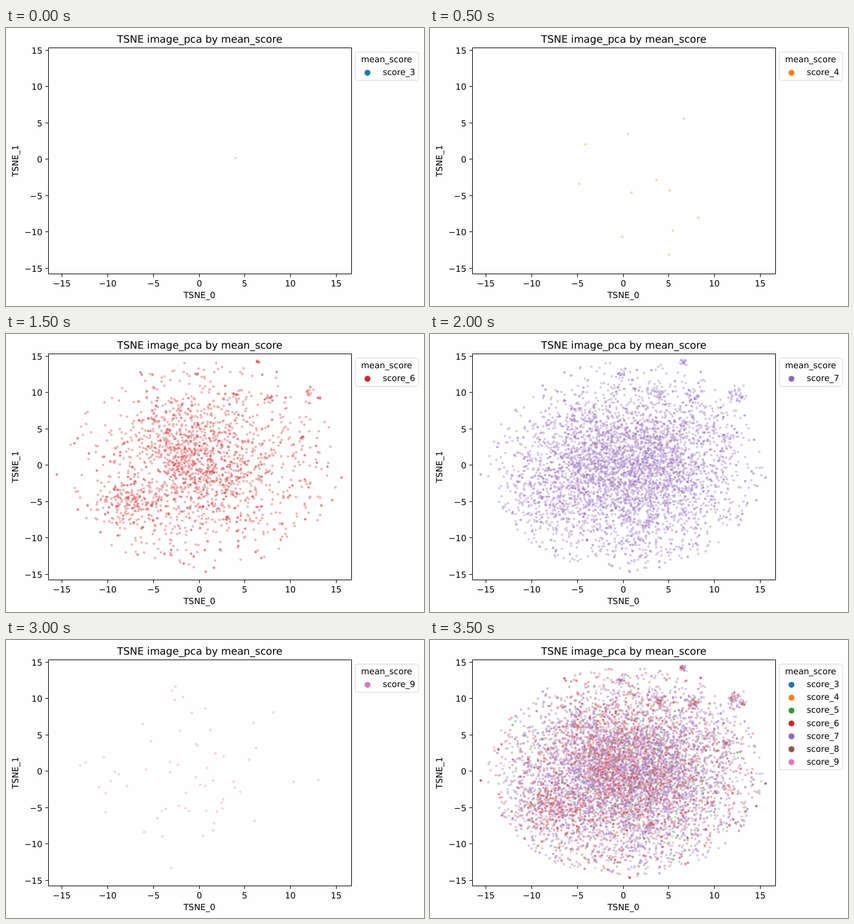
An HTML page with a canvas that plays this animation: 684x455 px, repeating every 4.5 s.

```html
<!DOCTYPE html>
<html lang="en">
<head>
<meta charset="utf-8">
<title>Scatter by score</title>
<style>
  html, body { margin: 0; width: 100%; height: 100%; overflow: hidden; background: #fefefe; }
  canvas, svg { position: absolute; left: 0; top: 0; }
  text { font: 13.89px "DejaVu Sans", sans-serif; text-rendering: geometricPrecision; }
  .title { font-size: 16.67px; }
</style>
</head>
<body>
<canvas id="plot" width="684" height="455"></canvas>
<svg width="684" height="455">
  <g id="axes"></g>
  <g id="legend"></g>
</svg>
<script>
const STEP = 500, LOOP = 4500, ALL = 7;
const colors = ["#1f77b4", "#ff7f0e", "#2ca02c", "#d62728", "#9467bd", "#8c564b", "#e377c2"];
const ctx = document.getElementById("plot").getContext("2d");

let seed = 20231;
function random() {
  seed = (Math.imul(seed, 1664525) + 1013904223) >>> 0;
  return (seed + 0.5) / 4294967296;
}

// Normally distributed cloud; wide clouds are cut off at the outer ellipse.
function cloud(n, x, y, sx, sy = sx, repeat = 0.14) {
  const out = [];
  while (out.length < n) {
    const r = Math.sqrt(-2 * Math.log(random())), a = random() * 2 * Math.PI;
    const px = x + sx * r * Math.cos(a), py = y + sy * r * Math.sin(a);
    if (sx > 20 && ((px - 320) / 226) ** 2 + ((py - 216) / 172) ** 2 > 1) continue;
    out.push([px, py]);
    if (random() < repeat) out.push([px, py]);
  }
  return out;
}

// Small tight clusters shared by the large groups: x, y, spread.
const knots = [
  [496, 95, 6], [511, 103, 3], [313, 66, 3], [413, 46, 4], [431, 105, 7],
  [375, 101, 5], [485, 170, 4], [360, 303, 5]];
const knotted = (density, tightness) =>
  knots.flatMap(([x, y, s]) => cloud(density * s, x, y, s * tightness));

const rim = [[83, 230], [327, 389], [549, 235], [220, 63], [443, 62], [112, 179], [534, 272]];
const darkGreen = [[135, 139], [251, 131], [298, 275], [398, 359], [503, 184], [465, 180]];

const groups = [
  [[375.5, 212.5]],
  [[244, 255], [391, 371], ...cloud(9, 350, 225, 45, 55, 0)],
  [...darkGreen, ...darkGreen, ...cloud(70, 320, 215, 105, 78, 0), ...cloud(52, 362, 205, 36, 42, 0)],
  [...rim, ...rim, ...knotted(2, 0.5),
    ...cloud(1350, 325, 212, 95, 80), ...cloud(290, 292, 182, 36, 32),
    ...cloud(200, 325, 228, 40, 28), ...cloud(190, 204, 278, 34, 22)],
  [...rim, ...rim, ...knotted(4, 1),
    ...cloud(3700, 318, 220, 96, 78), ...cloud(450, 325, 208, 45, 35),
    ...cloud(220, 200, 260, 50, 30), ...cloud(250, 425, 195, 45, 45)],
  [[96, 203], [108, 221], ...rim, ...knotted(1, 0.7), ...cloud(950, 318, 218, 98, 80)],
  [[152, 241], [511, 229], [290, 93], [270, 373], ...cloud(57, 325, 230, 88, 58, 0)]
].map((points, i) => points.map(([x, y]) => [x, y, i ? colors[i] : "#8e8e8e"]));

const mixed = groups.flat();
for (let i = mixed.length - 1; i > 0; i--) {
  const j = Math.floor(random() * (i + 1));
  [mixed[i], mixed[j]] = [mixed[j], mixed[i]];
}

function drawDots(points) {
  ctx.clearRect(0, 0, 684, 455);
  ctx.globalAlpha = 0.35;
  ctx.strokeStyle = "#fff";
  ctx.lineWidth = 0.4;
  for (const [x, y, color] of points) {
    ctx.beginPath();
    ctx.arc(x, y, 2.1, 0, 2 * Math.PI);
    ctx.fillStyle = color;
    ctx.fill();
    ctx.stroke();
  }
}

const label = (x, y, s, extra = "") => `<text x="${x}" y="${y}" ${extra}>${s}</text>`;

function drawAxes() {
  const mid = 'text-anchor="middle"';
  let ticks = "M69.5 32.5h496v370h-496z", out = "";
  for (let v = -15; v <= 15; v += 5) {
    const x = Math.round(315.5 + v * 14.95), y = Math.round(214.2 - v * 11.9);
    const s = String(v).replace("-", "\u2212");
    ticks += `M${x + 0.5} 403v4.5M69 ${y + 0.5}h-4.5`;
    out += label(x + 0.3, 423, s, mid) + label(59.5, y + 5.5, s, 'text-anchor="end"');
  }
  out += label(317, 24, "TSNE image_pca by mean_score", mid + ' class="title"');
  out += label(316.5, 442, "TSNE_0", mid);
  out += label(0, 0, "TSNE_1", mid + ' transform="translate(20 217.5) rotate(-90)"');
  document.getElementById("axes").innerHTML = `<path d="${ticks}" fill="none" stroke="#000"/>` + out;
}

function drawLegend(ids) {
  const gap = 21.1, height = 46 + gap * (ids.length - 1);
  let out = `<rect x="571.5" y="39.5" width="103.5" height="${height}" rx="3" fill="#fff" stroke="#d6d6d6"/>`;
  out += label(581, 56, "mean_score");
  ids.forEach((id, i) => {
    const y = 73.3 + i * gap;
    out += `<circle cx="591.5" cy="${y}" r="4.86" fill="${colors[id]}"/>` + label(616.5, y + 3.9, "score_" + (id + 3));
  });
  document.getElementById("legend").innerHTML = out;
}

let shown = -1;
function tick() {
  const phase = Math.min(ALL, Math.floor((performance.now() - start) % LOOP / STEP));
  if (phase !== shown) {
    shown = phase;
    drawDots(phase === ALL ? mixed : groups[phase]);
    drawLegend(phase === ALL ? [...colors.keys()] : [phase]);
  }
  requestAnimationFrame(tick);
}

drawAxes();
const start = performance.now();
tick();
</script>
</body>
</html>
```
